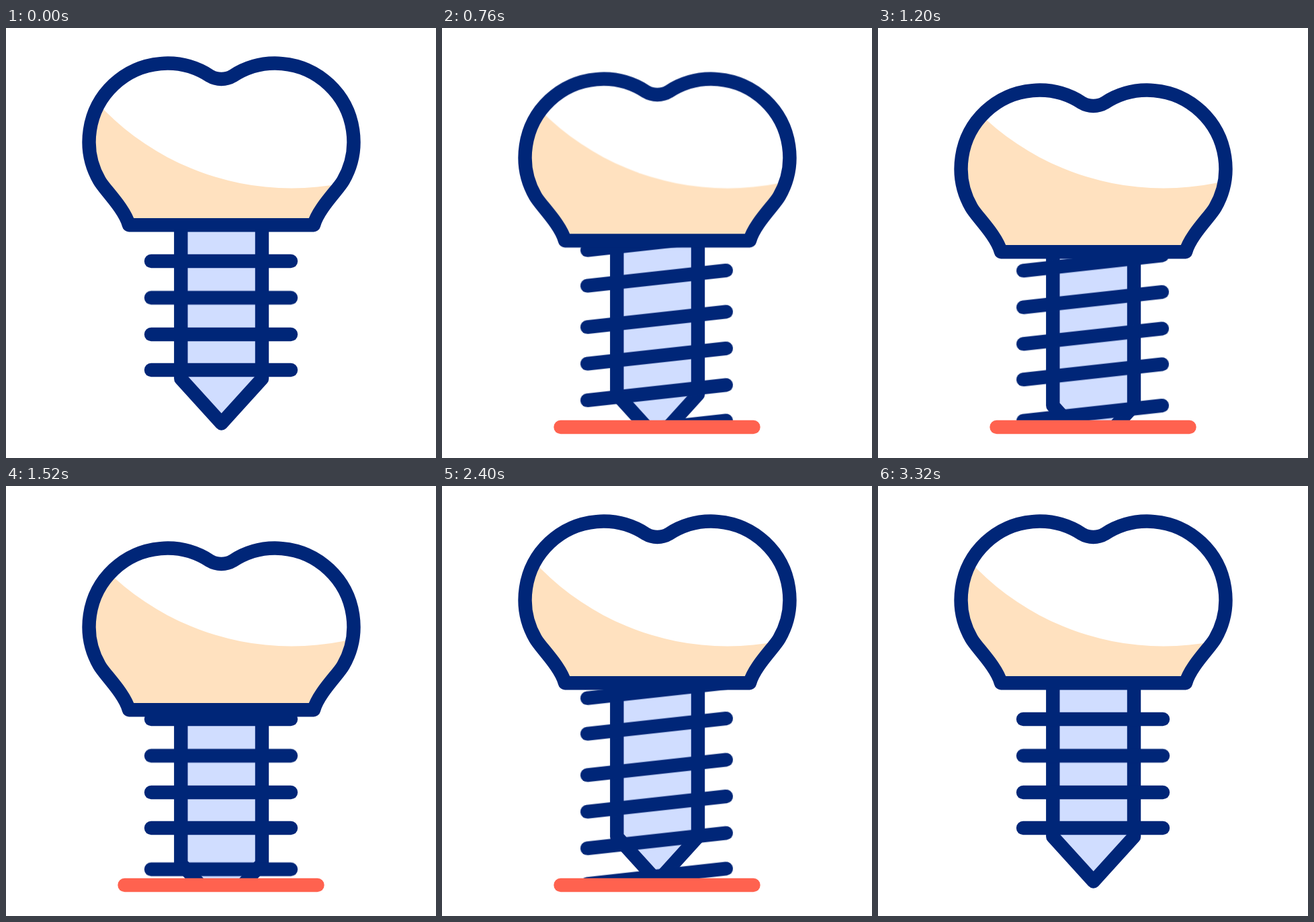
An HTML page for the animation above (3480 ms loop, 640 by 640 pixels).

```html
<!DOCTYPE html>
<html lang="en">
<head>
<meta charset="utf-8">
<title>Dental implant</title>
<style>
  html, body { margin: 0; width: 100%; height: 100%; overflow: hidden; background: #fff; }
  svg { display: block; width: 100%; height: 100%; }

  .line {
    stroke: #002678;
    stroke-width: 20.4;
    stroke-linecap: round;
    stroke-linejoin: round;
    fill: none;
  }
  .shaft { fill: #d0ddff; }
  .cream { fill: #ffe1bf; }
  .gum { stroke: #ff624f; stroke-dasharray: 1 2; }

  .sink, .stay, .scroll, .thread, .gum {
    animation: 3480ms cubic-bezier(.333, 0, .667, 1) infinite;
  }
  .sink { animation-name: sink; }
  .stay { animation-name: stay; }
  .scroll { animation-name: scroll; }
  .thread { animation-name: tilt; }
  .gum { animation-name: draw; }

  @keyframes sink {
    0%, 17.13%, 65.8%, 100% { transform: translateY(0); }
    25.66%, 54.89% { transform: translateY(40px); }
  }
  /* cancels the sinking, so the shade edge keeps its place */
  @keyframes stay {
    0%, 17.13%, 65.8%, 100% { transform: translateY(0); }
    25.66%, 54.89% { transform: translateY(-40px); }
  }
  @keyframes scroll {
    0%, 12.36%, 77.8%, 100% { transform: translateY(0); }
    35.35%, 53.8% { transform: translateY(223.5px); }
  }
  @keyframes tilt {
    0%, 12.36%, 43.68%, 53.16%, 84.77%, 100% { transform: translate(0, 0) rotate(0deg); }
    19.54%, 35.63%, 59.77%, 78.16% { transform: translate(-.5px, 3.7px) rotate(-6.3deg); }
  }
  @keyframes draw {
    0%, 1.44%, 95.4%, 100% { stroke-dashoffset: 1.01; }
    12.36%, 83.33% { stroke-dashoffset: 0; }
  }
</style>
</head>
<body>
<svg viewBox="0 0 640 640">
  <defs>
    <path id="crown" d="M183 293.2 C176 268 146 240 139 227 A116.5 116.5 0 0 1 304 71.7
      C309 74.8 315 76 320.5 76 S332 74.8 337 71.7 A116.5 116.5 0 0 1 502 227
      C495 240 465 268 458 293.2 Z"/>
    <clipPath id="inCrown"><use href="#crown"/></clipPath>
    <clipPath id="aboveGum"><rect width="640" height="600"/></clipPath>
  </defs>

  <g clip-path="url(#aboveGum)">
    <g class="sink">
      <path class="line shaft" d="M260.3 293 V522 L320.7 588.5 L381 522 V293"/>
    </g>
    <g class="scroll line">
      <g transform="translate(320 123.5)"><path class="thread" d="M-104 0H104"/></g>
      <g transform="translate(320 178)"><path class="thread" d="M-104 0H104"/></g>
      <g transform="translate(320 232.5)"><path class="thread" d="M-104 0H104"/></g>
      <g transform="translate(320 285.5)"><path class="thread" d="M-104 0H104"/></g>
      <g transform="translate(320 347)"><path class="thread" d="M-104 0H104"/></g>
      <g transform="translate(320 401.5)"><path class="thread" d="M-104 0H104"/></g>
      <g transform="translate(320 456)"><path class="thread" d="M-104 0H104"/></g>
      <g transform="translate(320 509)"><path class="thread" d="M-104 0H104"/></g>
    </g>
  </g>

  <g class="sink">
    <use href="#crown" class="cream"/>
    <g clip-path="url(#inCrown)">
      <circle class="stay" cx="425" cy="-154" r="392.5" fill="#fff"/>
    </g>
    <use href="#crown" class="line"/>
  </g>

  <path class="line gum" pathLength="1" d="M176.5 594H463.5"/>
</svg>
</body>
</html>
```
